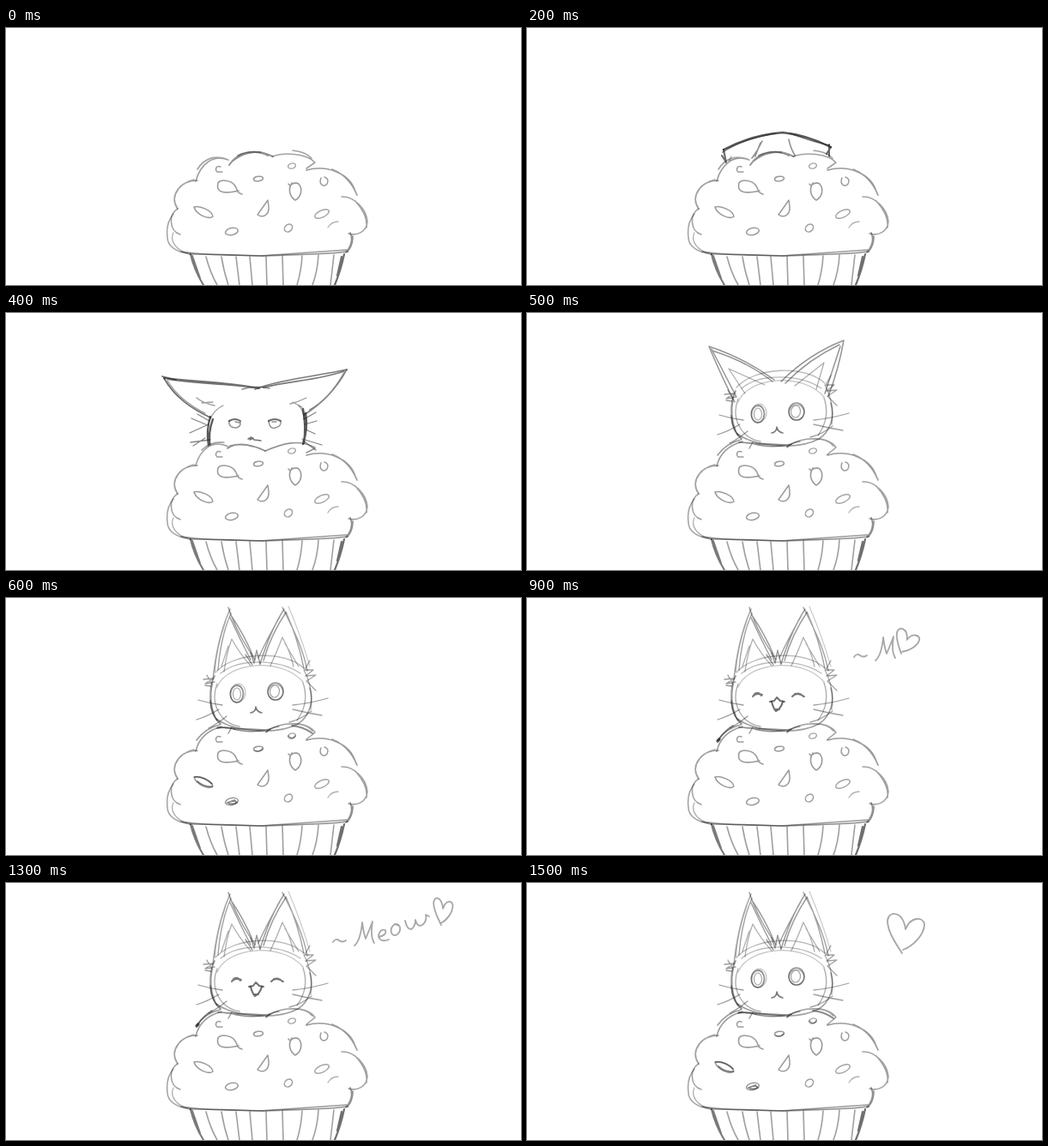
Animation of 600 by 300 pixels, one loop 1.8 s. Source, as an HTML page:

```html
<!DOCTYPE html>
<html lang="en">
<head>
<meta charset="utf-8">
<title>Muffin cat</title>
<style>
html, body { margin: 0; width: 100%; height: 100%; overflow: hidden; background: #fff; }
svg { display: block; width: 600px; height: 300px; filter: blur(0.35px); }
path { fill: none; stroke: #222; stroke-linecap: round; stroke-linejoin: round; }
.mask { fill: #fff; stroke: none; }
</style>
</head>
<body>
<svg id="stage" viewBox="0 0 600 300"></svg>
<script>
const NS = 'http://www.w3.org/2000/svg';
const LOOP = 1800, STEP = 100;
const stage = document.getElementById('stage');

function add(parent, tag, attrs) {
  const el = document.createElementNS(NS, tag);
  for (const k in attrs) el.setAttribute(k, attrs[k]);
  return parent.appendChild(el);
}
const group = (parent = stage) => add(parent, 'g', {});
const mask = (g, d) => add(g, 'path', { d, class: 'mask' });

// Each stroke: path, width, darkness
function pencil(g, strokes) {
  for (const [d, w = 1.7, o = 0.45] of strokes)
    add(g, 'path', { d, 'stroke-width': w, 'stroke-opacity': o });
  return g;
}

function oval(x, y, rx, ry, turn = 0) {
  const a = turn * Math.PI / 180;
  const dx = rx * Math.cos(a), dy = rx * Math.sin(a);
  return `M${x - dx},${y - dy}A${rx},${ry} ${turn} 1 1 ${x + dx},${y + dy}` +
    `A${rx},${ry} ${turn} 1 1 ${x - dx},${y - dy}`;
}

// Cat hiding behind the muffin
const peek = pencil(group(), [
  ['M229,142C248,132 270,124 298,122C318,124 338,131 354,139', 2.4, 0.75],
  ['M228,145C246,133 272,126 290,123M306,123L333,132L352,137', 1.5, 0.6],
  ['M229,142L232,157M227,149L231,155', 2.2, 0.65],
  ['M352,136L352,150M354,139L349,147', 2, 0.7],
  ['M274,132Q269,143 262,152M272,134L265,152', 1.6, 0.5],
  ['M305,130Q307,141 313,150', 1.5, 0.5],
  ['M238,150L235,155L246,153', 1.3, 0.4]
]);

const lowHead = pencil(group(), [
  ['M184,76C220,80 264,81 295,88M188,77C224,83 270,83 288,87', 1.8, 0.65],
  ['M182,74L198,78M184,76C197,99 217,112 238,122', 1.8, 0.65],
  ['M188,79C200,98 216,109 232,117', 1.2, 0.5],
  ['M397,66C360,74 318,78 290,89M394,68C362,79 330,79 300,87', 1.7, 0.6],
  ['M397,66C384,90 368,106 347,119M394,70C382,91 367,106 354,113', 1.6, 0.55],
  ['M275,89Q290,84 307,88', 1.4, 0.5],
  ['M222,99Q229,105 243,108M228,105L241,104M331,106Q340,104 350,99M334,104L345,110', 1.3, 0.45],
  ['M253,108Q242,113 238,124M341,108Q347,114 347,124', 1.3, 0.45],
  ['M238,121Q233,137 236,155M241,124Q235,140 238,157', 2.2, 0.75],
  ['M346,112Q350,132 347,152M349,117Q352,135 346,153', 2.4, 0.75],
  ['M216,123L235,131M223,118L237,126M214,140L236,130M215,151L238,148M218,155L232,146', 1.3, 0.55],
  ['M347,124L361,116M348,130L362,126M349,136L360,141M345,147L368,154M346,149L361,160', 1.3, 0.55],
  ['M260,126Q267,122 273,126M306,126Q313,122 320,126', 2.1, 0.65],
  ['M260,126Q259,134 268,134Q274,133 273,127M306,126Q307,136 314,134Q321,132 320,127', 1.4, 0.5],
  ['M267,127L272,128M310,127L315,127', 1.4, 0.5],
  ['M282,147L286,145L289,148L297,149M284,148L288,146', 1.5, 0.65]
]);

const MUFFIN = 'M215,264C188,262 184,247 193,239C186,228 192,217 200,213' +
  'C190,195 203,180 222,178C224,158 242,147 260,155';
const MUFFIN_END = 'C376,159 403,168 408,195C418,204 426,222 416,236L401,241' +
  'C405,250 401,257 396,262L383,300L230,300Z';

const backFull = group(), backPressed = group();
mask(backFull, MUFFIN + 'C273,143 293,140 311,150C322,145 349,143 360,157L354,165' + MUFFIN_END);
mask(backPressed, MUFFIN + 'C277,151 289,155 302,161C320,151 340,149 360,160L354,165' + MUFFIN_END);

pencil(backFull, [
  ['M260,160C269,145 290,140 311,150M263,156C276,145 292,142 305,149', 1.8, 0.5],
  ['M270,149Q280,143 297,145', 1.6, 0.5],
  ['M310,150C324,145 350,146 360,157L350,164M334,143Q348,144 356,152', 1.6, 0.42],
  ['M259,154C240,147 226,160 221,179M223,165C232,150 246,149 257,153', 1.6, 0.42]
]);
pencil(backPressed, [
  ['M258,158C270,150 285,153 302,161M261,155Q276,152 288,156', 1.7, 0.5],
  ['M302,161C323,152 341,147 360,157M350,163L360,158', 1.6, 0.48],
  ['M259,156C240,147 226,160 221,178M228,160Q238,150 254,151', 1.6, 0.42]
]);

// Parts of the muffin that never change
pencil(group(), [
  ['M223,178C202,178 190,196 200,211M198,193Q204,180 219,177', 1.7, 0.42],
  ['M200,211C189,217 190,237 203,241', 1.6, 0.42],
  ['M195,217Q186,228 188,244C188,255 199,262 215,264', 1.6, 0.4],
  ['M195,239C190,250 200,260 212,263', 1.3, 0.35],
  ['M350,166C374,159 401,170 407,191M380,165Q400,173 409,195', 1.7, 0.45],
  ['M391,197C405,196 420,211 421,226C420,238 409,243 399,240M407,202Q422,219 420,233', 1.6, 0.42],
  ['M401,239C405,248 401,256 396,262M404,243Q404,254 398,261', 1.7, 0.5],
  ['M204,261C232,266 272,265 302,266C338,264 367,265 398,261', 1.7, 0.5],
  ['M214,264Q253,264 300,266M296,266Q352,262 397,259', 1.4, 0.45],
  ['M215,264Q219,282 230,300M217,266L226,292', 2.1, 0.6],
  ['M394,264Q390,283 383,300M391,267L386,289', 2.2, 0.65],
  ['M233,267Q238,286 246,300M251,267Q254,285 259,300M268,267L272,300M284,267L287,300', 1.6, 0.43],
  ['M303,267L304,300M322,266L323,300M345,266Q344,284 339,300M364,265Q363,284 357,300M382,265L378,300', 1.6, 0.43],
  ['M247,181C250,176 262,178 266,183C271,189 267,191 275,194M271,190C257,193 244,194 247,181', 1.6, 0.45],
  ['M219,209C226,207 240,213 241,220C236,224 222,218 219,209', 1.6, 0.45],
  ['M305,201L293,218C299,222 307,219 306,208Z', 1.5, 0.45],
  ['M333,181C328,189 331,197 337,201C344,197 346,188 341,182Q336,179 331,184L329,182', 1.6, 0.45],
  [oval(294, 176, 5.5, 2.7, -8), 1.6, 0.45],
  [oval(333, 161, 4.5, 3, -15), 1.4, 0.4],
  ['M250,162C245,160 243,165 246,168L252,168', 1.5, 0.45],
  ['M367,175C364,182 370,187 374,182Q377,176 371,174', 1.5, 0.45],
  [oval(368, 217, 9, 4, -25), 1.5, 0.42],
  [oval(263, 237.5, 7.5, 4, -12), 1.5, 0.45],
  [oval(329, 233.5, 5, 4, -40), 1.5, 0.43],
  ['M375,233Q379,226 387,226', 1.3, 0.35]
]);

// Cat standing in front
const HEAD = 'M247,84C236,98 234,128 246,143C266,157 318,160 340,147C356,136 360,105 345,83C328,62 265,62 247,84Z';
const front = group();
mask(front, HEAD);
pencil(front, [
  ['M244,87C265,63 324,60 347,82M250,88C271,70 318,71 343,88', 1.3, 0.32],
  ['M246,104C258,74 322,69 346,98', 1.2, 0.28],
  ['M243,91C236,104 236,130 246,143M240,100Q236,122 243,137', 1.7, 0.48],
  ['M238,120Q239,138 250,147', 1.8, 0.5],
  ['M246,100C237,124 250,146 272,150', 1.3, 0.38],
  ['M245,141C267,157 316,160 340,147C354,138 359,120 354,105', 1.6, 0.43],
  ['M347,84Q358,104 355,130M346,99Q354,122 339,143', 1.3, 0.38],
  ['M230,95L241,94L232,100L243,98M234,90L240,101M232,102L239,103', 1.3, 0.45],
  ['M354,73L348,84L358,84L349,91L361,90L350,97L361,108', 1.3, 0.42],
  ['M224,119Q237,123 252,125M222,142Q235,138 248,130M236,152Q246,147 257,138', 1.3, 0.45],
  ['M334,125Q354,123 375,117M334,130Q350,134 368,137M330,145Q343,142 356,132', 1.3, 0.42]
]);

const earsUp = pencil(group(), [
  ['M261,13C250,38 244,66 241,95M262,18Q250,45 247,84M256,26Q245,58 243,86', 1.4, 0.42],
  ['M259,11C267,36 279,55 290,72M262,20Q277,42 288,68M261,23Q273,49 285,72', 1.4, 0.45],
  ['M263,48Q257,64 254,86M263,48Q273,66 285,79M259,56L251,80', 1.3, 0.36],
  ['M324,13C313,30 304,51 296,77M326,17Q309,42 300,73M319,22Q306,44 294,70', 1.4, 0.45],
  ['M322,11C334,35 346,58 351,85M326,16Q340,47 347,82', 1.4, 0.42],
  ['M329,10Q344,45 354,80', 1.1, 0.25],
  ['M322,46Q316,62 308,79M322,46Q331,62 335,80M325,53L341,80', 1.3, 0.36],
  ['M285,64L289,76L292,61L296,77M279,66L287,78', 1.4, 0.45]
]);

const earsMid = pencil(group(), [
  ['M212,39Q227,75 242,104M215,42L244,98M212,39Q254,53 288,78M216,44Q257,57 286,80', 1.5, 0.48],
  ['M369,32Q328,48 296,80M364,37Q328,54 301,82M369,32Q363,66 351,97M365,39L347,94', 1.5, 0.48],
  ['M235,65L254,94M235,65L277,84M346,58L312,85M346,58L337,89', 1.2, 0.38]
]);

const seat = pencil(group(), [
  ['M221,179Q226,157 251,150M222,166Q232,152 249,148', 1.6, 0.45],
  ['M247,151Q276,153 304,154M262,152Q284,159 308,153', 1.7, 0.52],
  ['M259,158L263,151M303,157Q308,151 318,150', 1.5, 0.45],
  ['M303,156C320,144 351,143 360,157L350,165M333,147Q350,146 357,155', 1.6, 0.43]
]);

const openFace = pencil(group(), [
  [oval(269, 112, 7.5, 10, 3), 1.8, 0.5],
  [oval(270, 111, 9, 11, 8), 1, 0.35],
  [oval(269, 112, 4.5, 7), 1.2, 0.4],
  [oval(314, 109, 9, 10), 1.7, 0.48],
  [oval(314, 110, 9, 9, 14), 1.1, 0.38],
  [oval(313, 109, 5.5, 7, 5), 1.2, 0.42],
  ['M285,134Q291,133 291,127Q292,133 298,134', 1.6, 0.6]
]);

const chipAccents = pencil(group(), [
  ['M220,209Q230,208 240,217M223,214Q231,221 240,220', 1.8, 0.52],
  ['M258,239L266,236L269,239Q263,242 258,239', 1.8, 0.55],
  ['M290,178Q295,181 299,176M329,161Q333,166 337,161', 1.4, 0.48],
  ['M246,152Q256,150 267,153M333,149Q346,150 357,158', 1.8, 0.52]
]);

const happyFace = pencil(group(), [
  ['M263,115Q266,110 274,113M265,112Q270,109 273,114', 2, 0.6],
  ['M309,115Q314,109 323,115M312,112Q318,110 322,115', 2, 0.62],
  ['M283,121L288,120L291,116L295,120L300,121', 2, 0.65],
  ['M285,121Q287,129 290,132Q296,129 298,121M289,130L294,130', 2.1, 0.65],
  ['M222,167L224,165', 3.2, 0.75],
  ['M223,166Q230,155 240,149', 2, 0.5]
]);

// Lettering, one group per sign
const INK = [1.8, 0.4];
const letters = [
  'M381,69Q384,64 388,67T396,67',
  'M406,73Q413,67 415,46Q417,60 419,65Q424,53 427,45Q424,62 429,70',
  'M434,63Q444,61 442,55Q436,53 434,61Q435,70 446,66',
  'M453,48C446,53 448,62 454,61C461,58 461,47 453,48L458,50',
  'M465,44Q467,54 472,54Q477,51 477,43Q479,52 485,49Q491,44 489,37L493,39'
].map(d => pencil(group(), [[d, ...INK]]));

const heart = pencil(group(), [
  ['M0,0C-7,-11 -17,-25 -17,-38C-16,-50 1,-50 4,-28C10,-43 24,-43 26,-34C26,-21 12,-8 1,-4', ...INK]
]);
const heartLine = heart.firstChild;
heartLine.setAttribute('vector-effect', 'non-scaling-stroke');

// Tip x, tip y, scale x, scale y, turn for each step that shows a heart
const hearts = {
  8: [413, 69, 0.64, 0.62, 14], 9: [436, 65, 0.64, 0.62, 14], 10: [456, 62, 0.6, 0.63, 9],
  11: [473, 57, 0.56, 0.65, 4], 12: [506, 50, 0.53, 0.67, 0], 13: [507, 49, 0.52, 0.68, 0],
  14: [472, 65, 0.76, 0.84, 0], 15: [437, 82, 1, 1, 0]
};

function show(el, on) { el.style.display = on ? '' : 'none'; }
function shift(el, y) { el.setAttribute('transform', `translate(0 ${y})`); }

function pose(n) {
  const up = n >= 5, talking = n >= 8 && n < 14, calm = n >= 6 && !talking;
  show(peek, n === 1 || n === 2);
  shift(peek, n === 1 ? 14 : 0);
  show(lowHead, n === 3 || n === 4);
  shift(lowHead, n === 3 ? 23 : 0);
  show(backFull, n < 3);
  show(backPressed, n === 3 || n === 4);
  show(front, up);
  show(seat, up);
  show(earsUp, n >= 6);
  show(earsMid, n === 5);
  show(openFace, up && !talking);
  shift(openFace, n === 5 ? 6 : 0);
  show(chipAccents, calm);
  show(happyFace, talking);
  letters.forEach((el, i) => show(el, talking && n >= 8 + i));

  const h = hearts[Math.min(n, 15)];
  show(heart, h);
  if (h) {
    const [x, y, sx, sy, turn] = h;
    heart.setAttribute('transform', `translate(${x} ${y}) rotate(${turn}) scale(${sx} ${sy})`);
  }
}

const start = performance.now();
let last = -1;
function tick() {
  const n = Math.floor((performance.now() - start) % LOOP / STEP);
  if (n !== last) pose(last = n);
  requestAnimationFrame(tick);
}
tick();
</script>
</body>
</html>
```
